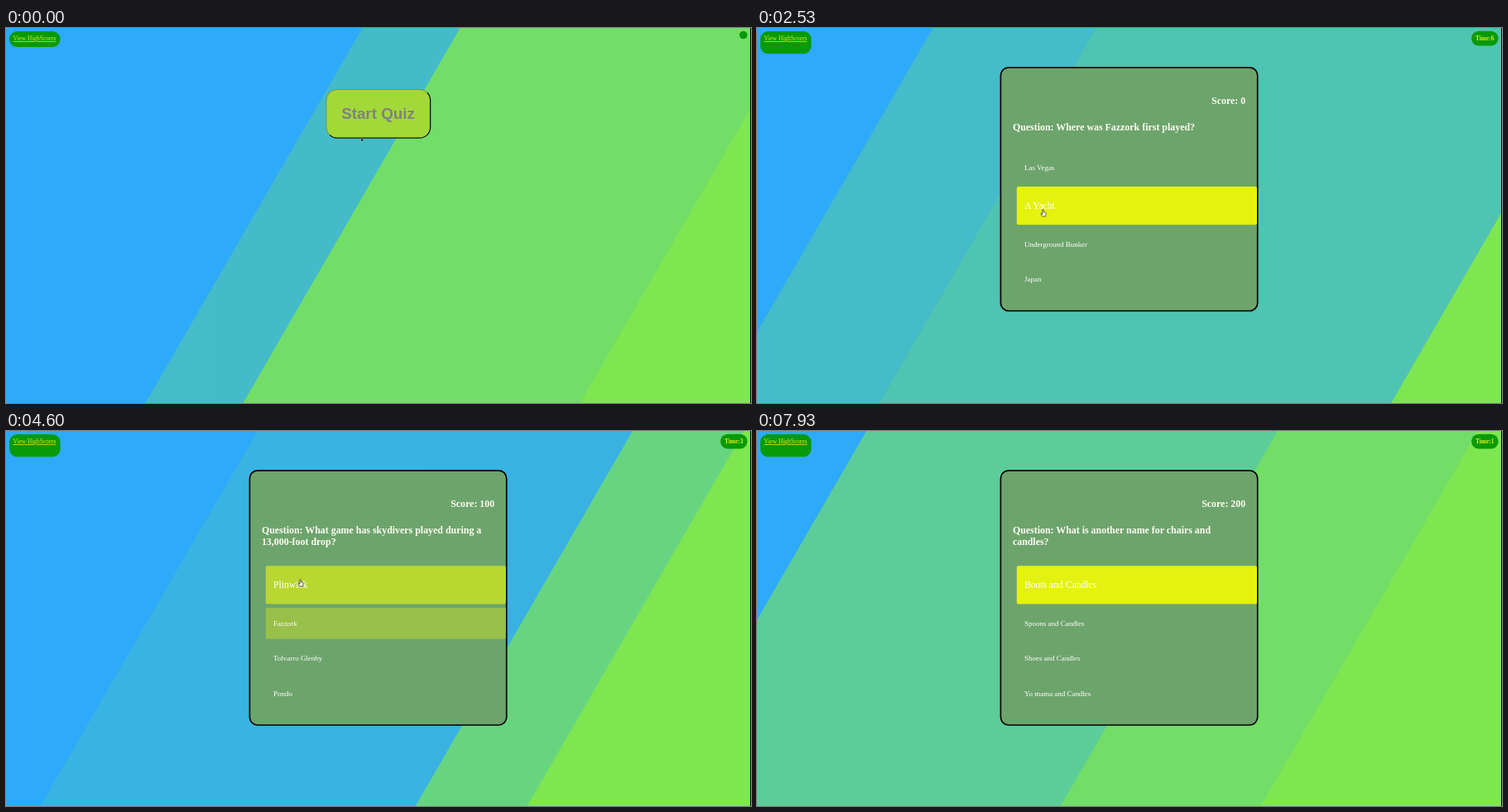
An HTML page that plays this animation: 900 px wide and 454 px high, repeating every 8 s.

```html
<!DOCTYPE html>
<html lang="en">
<head>
<meta charset="utf-8">
<title>Quiz</title>
<style>
  html, body { margin: 0; width: 100%; height: 100%; overflow: hidden; background: #fff; }
  svg { display: block; width: 100%; height: 100%; }
  text { font-family: "Liberation Serif", "Times New Roman", serif; white-space: pre; }
  .small { font-size: 7.4px; fill: #e2ee1c; }
  .bold { font-size: 11.92px; font-weight: bold; fill: #fdfdf2; }
  .row text { fill: #fff; }
  .start { font: bold 18.8px "Liberation Sans", Arial, sans-serif; }
</style>
</head>
<body>
<svg id="stage" viewBox="0 0 900 454" preserveAspectRatio="none"></svg>
<script>
const LOOP = 8000, START = 580, TICK = 3890;
const BLUE = 'rgb(17,159,250)', LIME = 'rgb(109,228,57)';
const YELLOW = [229, 242, 16], PILL = '#089a08';

const QUESTIONS = [
  { at: START, lines: ['Question: Where was Fazzork first played?'],
    options: ['Las Vegas', 'A Yacht', 'Underground Bunker', 'Japan'] },
  { at: 3700, lines: ['Question: What game has skydivers played during a', '13,000-foot drop?'],
    options: ['Plinwick', 'Fazzork', 'Tolvarro Glenby', 'Pondo'] },
  { at: 6200, lines: ['Question: What is another name for chairs and', 'candles?'],
    options: ['Boots and Candles', 'Spoons and Candles', 'Shoes and Candles', 'Yo mama and Candles'] }
];
const SCORES = [{ at: 0, value: 0 }, { at: 2800, value: 100 }, { at: 5200, value: 200 }];
const HOVERS = [{ at: 0, row: -1 }, { at: 1140, row: 0 }, { at: 1950, row: 1 }, { at: 4490, row: 0 }];
const POINTER = [
  [0, 429, 133], [250, 432, 112], [620, 432, 112], [1140, 368, 146], [1330, 361, 169.5],
  [1750, 361, 169.5], [2100, 345.5, 219.5], [4380, 345.5, 219.5], [4600, 355.5, 179.5],
  [4950, 350.5, 186.5]
];

const stage = document.getElementById('stage');

function add(tag, attrs, parent = stage) {
  const el = document.createElementNS('http://www.w3.org/2000/svg', tag);
  set(el, attrs);
  return parent.appendChild(el);
}
function set(el, attrs) {
  for (const key in attrs) el.setAttribute(key, attrs[key]);
}
function label(attrs, content = '', parent = stage) {
  const el = add('text', attrs, parent);
  el.textContent = content;
  return el;
}
const show = (el, on) => set(el, { visibility: on ? 'visible' : 'hidden' });
const clamp = v => Math.min(1, Math.max(0, v));
const latest = (list, t) => list.filter(item => item.at <= t).pop();

function bezier(x1, y1, x2, y2) {
  const curve = (a, b, s) => 3 * a * s * (1 - s) ** 2 + 3 * b * s * s * (1 - s) + s ** 3;
  return x => {
    if (x <= 0 || x >= 1) return clamp(x);
    let lo = 0, hi = 1;
    for (let i = 0; i < 24; i++) {
      const mid = (lo + hi) / 2;
      if (curve(x1, x2, mid) < x) lo = mid; else hi = mid;
    }
    return curve(y1, y2, lo);
  };
}
const easeInOut = bezier(.42, 0, .58, 1);
const ease = bezier(.25, .1, .25, 1);

function mix(a, b, k) {
  return `rgb(${a.map((v, i) => Math.round(v + (b[i] - v) * k))})`;
}

// Sliding diagonals: three half-transparent layers
const layers = [[3000, false], [4000, true], [5000, false]].map(([span, reverse]) => {
  const g = add('g', { opacity: .5 });
  add('rect', { width: 900, height: 454, fill: BLUE }, g);
  return { span, reverse, edge: add('path', { fill: LIME }, g) };
});

// Header
const scoresPill = add('rect', { x: 4, y: 4, width: 61.6, rx: 9.4, fill: PILL });
label({ x: 8.5, y: 15, class: 'small', 'text-decoration': 'underline' }, 'View HighScores');
const timePill = add('rect', { y: 3.7, fill: PILL });
const timeText = label({ x: 868, y: 15, class: 'small', 'font-weight': 'bold' });

// Start button
const startGroup = add('g', {});
const startBox = add('rect', { x: 387, y: 74.5, width: 125.6, height: 58.7, rx: 13 }, startGroup);
add('path', { d: 'M391 129.4A13 13 0 0 1 387 120V87.5A13 13 0 0 1 400 74.5H499.6A13 13 0 0 1 508.8 78.3',
  fill: 'none', stroke: '#7d8a4c', 'stroke-width': .9 }, startGroup);
add('path', { d: 'M508.8 78.3A13 13 0 0 1 512.6 87.5V120.2A13 13 0 0 1 499.6 133.2H400A13 13 0 0 1 391 129.4',
  fill: 'none', stroke: '#101a08', 'stroke-width': 1.3 }, startGroup);
const startText = label({ x: 449.5, y: 110, 'text-anchor': 'middle', class: 'start' }, 'Start Quiz', startGroup);

// Question card
const card = add('g', {});
const cardBox = add('rect', { x: 294.4, y: .8, width: 310.3, rx: 9.5,
  fill: '#6da46c', stroke: '#000', 'stroke-width': 1.7 }, card);
const scoreText = label({ x: 590.2, y: 44.5, 'text-anchor': 'end', class: 'bold' }, '', card);
const lineTexts = [0, 1].map(i => label({ x: 308.9, y: 77.2 + i * 13.5, class: 'bold' }, '', card));
const rows = [0, 1, 2, 3].map(() => {
  const g = add('g', { class: 'row' }, card);
  return {
    box: add('rect', { x: 313.8, width: 290.2, rx: 2, fill: `rgb(${YELLOW})` }, g),
    text: label({ x: 323 }, '', g)
  };
});

// Pointers
const arrow = add('path', { d: 'M0 0L3.2 3.2L1.9 3.3L1.2 4.4L0 3.8Z', fill: '#111', stroke: '#ddd', 'stroke-width': .3 });
const hand = add('path', {
  d: 'M-.6 .6Q0 -.4 .6 .6V3.2L3 3.8Q4 4.2 3.8 5.6L3 8.6H-.8L-2.6 5.6Q-2.8 4.6 -1.7 4.9L-.6 5.8Z',
  fill: '#fff', stroke: '#222', 'stroke-width': .7, 'stroke-linejoin': 'round'
});

// The page runs slightly slow before the start and halts near the end
function pageTime(t) {
  return t < START ? 2396 + t * 494 / START : Math.min(2310 + t, 9875);
}

function drawBackground(clock) {
  for (const { span, reverse, edge } of layers) {
    const turn = (clock / span) % 2;
    const k = easeInOut(turn > 1 ? 2 - turn : turn);
    const x = 899 * (reverse ? 1 - k : k);
    const lean = 227 * Math.tan(Math.PI / 6);
    set(edge, { d: `M${x + lean} 0H1200V454H${x - lean}Z` });
  }
}

function drawHeader(clock) {
  const ticking = clock >= TICK;
  set(scoresPill, { height: ticking ? 27.2 : 19 });
  set(timePill, ticking ? { x: 863, width: 32.6, height: 17.8, rx: 8.9 }
                        : { x: 886, width: 9.6, height: 9.6, rx: 4.8 });
  timeText.textContent = ticking ? 'Time:' + (6 - Math.floor((clock - TICK) / 1000)) : '';
}

function drawStart(t) {
  show(startGroup, t < START);
  const k = ease(clamp(t / 180));
  set(startBox, { fill: mix([162, 217, 56], YELLOW, k) });
  set(startText, { fill: mix([128, 128, 128], [255, 255, 255], k) });
}

// Share of the highlight on a row, faded in and out over 300 ms
function glow(row, t) {
  let k = 0;
  HOVERS.forEach((h, i) => {
    if (t < h.at) return;
    const p = ease(clamp((t - h.at) / 300));
    if (h.row === row) k = p;
    else if (i && HOVERS[i - 1].row === row) k = 1 - p;
  });
  return k;
}

function drawCard(t, clock) {
  set(card, { display: t < START ? 'none' : 'inline' });
  if (t < START) return;
  const { lines, options } = latest(QUESTIONS, t);
  const hovered = latest(HOVERS, t).row;
  set(card, { transform: `translate(0 ${clock >= TICK ? 47.1 : 38.6})` });
  scoreText.textContent = 'Score: ' + latest(SCORES, t).value;
  lineTexts.forEach((el, i) => { el.textContent = lines[i] || ''; });
  let y = 102.6 + (lines.length - 1) * 13.5;
  rows.forEach(({ box, text }, i) => {
    const on = i === hovered;
    const height = on ? 46.3 : 37.7, size = on ? 11.64 : 8.95;
    set(box, { y, height, opacity: glow(i, t) });
    set(text, { y: y + height / 2 + size * .3375, 'font-size': size });
    text.textContent = options[i];
    y += height + 4.6;
  });
  set(cardBox, { height: y + 14.2 });
}

function drawPointer(t) {
  let i = 0;
  while (i < POINTER.length - 2 && POINTER[i + 1][0] <= t) i++;
  const [t0, x0, y0] = POINTER[i], [t1, x1, y1] = POINTER[i + 1];
  const k = clamp((t - t0) / (t1 - t0));
  const transform = `translate(${x0 + (x1 - x0) * k} ${y0 + (y1 - y0) * k})`;
  set(arrow, { transform });
  set(hand, { transform });
  show(arrow, t < 60);
  show(hand, t >= 60 && t < 7565);
}

function render(t) {
  const clock = pageTime(t);
  drawBackground(clock);
  drawHeader(clock);
  drawStart(t);
  drawCard(t, clock);
  drawPointer(t);
}

add('rect', { x: 899, width: 1, height: 454, fill: '#000' });

const begin = performance.now();
function frame() {
  render((performance.now() - begin) % LOOP);
  requestAnimationFrame(frame);
}
frame();
</script>
</body>
</html>
```
